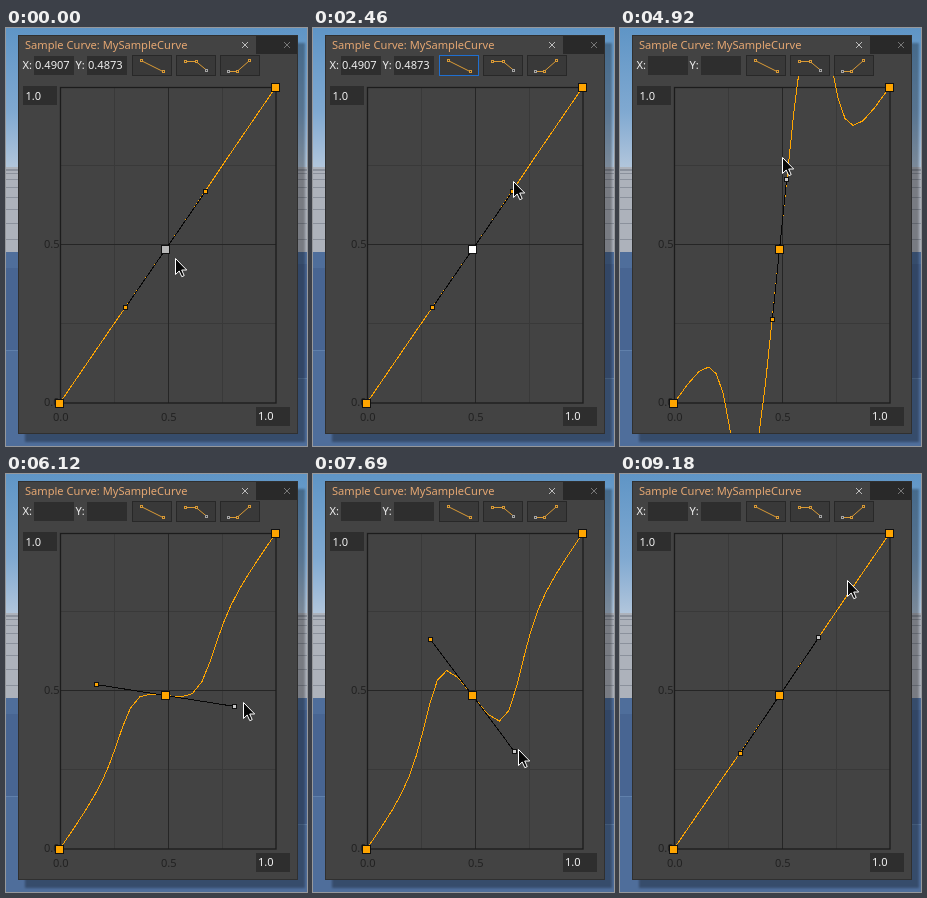
Animation of 301 by 418 pixels, one loop 9210 ms. Source, as an HTML page:

```html
<!DOCTYPE html>
<html lang="en">
<head>
<meta charset="utf-8">
<title>Curve editor</title>
<style>
  html, body { margin: 0; width: 100%; height: 100%; overflow: hidden; background: #434343; }
  svg { display: block; width: 301px; height: 418px; }
  text { font: 11.1px "Noto Sans", "Open Sans", sans-serif; fill: #f0f0f0; white-space: pre; }
  .axis { fill: #222; }
  .field { fill: #2e2e2e; }
  .key { fill: #ffa500; stroke: #111; }
  .icon path { fill: none; stroke: #d99a35; }
  .icon rect { fill: #333; stroke: #d99a35; }
  .icon .grey { stroke: #a5a5a5; }
  .crisp { fill: none; shape-rendering: crispEdges; }
</style>
</head>
<body>
<svg viewBox="0 0 301 418">
  <defs>
    <linearGradient id="sky" x2="0" y2="1">
      <stop offset="0" stop-color="#5f95c6"/>
      <stop offset=".6" stop-color="#80a9d1"/>
      <stop offset="1" stop-color="#b2c6dc"/>
    </linearGradient>
    <clipPath id="plot"><rect x="13" y="48" width="278" height="357"/></clipPath>
    <filter id="soft"><feGaussianBlur stdDeviation="1.2"/></filter>
  </defs>

  <rect width="301" height="140" fill="url(#sky)"/>
  <rect y="139" width="301" height="86" fill="#adb2bb"/>
  <g id="floor" stroke="#8b919c"></g>
  <rect y="224" width="301" height="194" fill="#4f6e9b"/>
  <path d="M0 240H12V322H0ZM292 236H301V350H292Z" fill="#486592"/>
  <path d="M0 322.5H12M292 350.5H301" stroke="#6080ab"/>

  <rect x="19" y="15" width="280" height="399" opacity=".3" filter="url(#soft)"/>
  <rect x="12" y="7" width="280" height="399" fill="#434343"/>
  <rect x="250" y="8" width="42" height="18" fill="#292929"/>
  <rect x="12.5" y="7.5" width="279" height="398" fill="none" stroke="#303030"/>
  <text x="19" y="21" style="fill:#e5a772">Sample Curve: MySampleCurve</text>
  <path d="M236 14l6 6m0-6l-6 6" stroke="#bdbdbd"/>
  <path d="M278 14l6 6m0-6l-6 6" stroke="#777"/>

  <g class="field">
    <rect x="28" y="28" width="40" height="19"/>
    <rect x="81" y="28" width="40" height="19"/>
    <rect x="17" y="58" width="34" height="19"/>
    <rect x="250" y="379" width="34" height="19"/>
  </g>
  <text x="16.5" y="41">X:</text>
  <text x="69.5" y="41">Y:</text>
  <g id="coords">
    <text x="29" y="41">0.4907</text>
    <text x="82" y="41">0.4873</text>
  </g>

  <g fill="#393939" stroke="#282828">
    <rect id="linear" x="126.5" y="27.5" width="39" height="20"/>
    <rect x="170.5" y="27.5" width="39" height="20"/>
    <rect x="214.5" y="27.5" width="39" height="20"/>
  </g>
  <g class="icon">
    <path d="M136 33L157 43.5M180 33.5H190L201 42.5M223 43.5H231L243 33"/>
    <rect x="134.5" y="31.5" width="2" height="2"/>
    <rect x="156.5" y="42.5" width="2" height="2"/>
    <rect x="178.5" y="32.5" width="2" height="2"/>
    <rect x="189.5" y="32.5" width="2" height="2"/>
    <rect class="grey" x="199.5" y="41.5" width="2" height="2"/>
    <rect class="grey" x="221.5" y="42.5" width="2" height="2"/>
    <rect x="230.5" y="42.5" width="2" height="2"/>
    <rect x="242.5" y="31.5" width="2" height="2"/>
  </g>

  <path d="M108.5 59V375M216.5 59V375M54 137.5H270M54 295.5H270" stroke="#393939"/>
  <path d="M162.5 59V375M54 216.5H270" stroke="#252525"/>
  <rect x="54.5" y="59.5" width="215.5" height="315.5" fill="none" stroke="#1c1c1c" stroke-width="1.3"/>
  <text x="19.5" y="72">1.0</text>
  <text x="252" y="392">1.0</text>
  <text class="axis" x="38" y="220">0.5</text>
  <text class="axis" x="38" y="378">0.0</text>
  <text class="axis" x="47" y="393">0.0</text>
  <text class="axis" x="155" y="393">0.5</text>

  <path id="curve" class="crisp" stroke="#ffa500" clip-path="url(#plot)"/>
  <path id="arm" class="crisp" stroke="#080808"/>
  <rect class="key" x="49.5" y="371.5" width="8" height="8"/>
  <rect class="key" x="265.5" y="55.5" width="8" height="8"/>
  <rect class="key" id="mid" x="155.5" y="217.5" width="8" height="8"/>
  <rect class="key" id="left" width="4" height="4"/>
  <rect class="key" id="right" width="4" height="4"/>
  <path id="cursor" d="M.5 .5V16.5L4.2 13L6.8 18.7L9.2 17.6L6.7 12H11.7Z" fill="#080808" stroke="#fff"/>
</svg>
<script>
const LOOP = 9210, STEP = 30, ARM = 70, END_SLOPE = 1.463;
const HOVER = 1190, GRAB = 2910;
const START = { x: 53.5, y: 375.5 }, MID = { x: 159.5, y: 221.5 }, END = { x: 269.5, y: 59.5 };
const REST = [169, 230], BUTTON = [150, 36], HANDLE = [200, 154];

// While dragging: ms, handle angle in degrees, pointer distance from the middle key.
const DRAG = [
  [GRAB, 55.4, 79], [3890, 85.9, 91], [4920, 84.2, 93], [6120, -9, 78],
  [7000, -84, 80], [7690, -53.2, 70], [9180, 55.9, 134]
];

const el = id => document.getElementById(id);
const mix = (a, b, k) => a + (b - a) * k;
const rad = deg => deg * Math.PI / 180;

function ease(t, from, to) {
  const k = Math.min(1, Math.max(0, (t - from) / (to - from)));
  return k * k * (3 - 2 * k);
}

function dragPose(t) {
  let i = 0;
  while (i < DRAG.length - 2 && t >= DRAG[i + 1][0]) i++;
  const [a, b] = [DRAG[i], DRAG[i + 1]];
  const k = ease(t, a[0], b[0]);
  return { angle: mix(a[1], b[1], k), reach: mix(a[2], b[2], k) };
}

// The pointer leads the handle by a few degrees while dragging.
function pointerAt(t, pose) {
  if (t >= GRAB) {
    const lead = rad(pose.angle + 4);
    return [MID.x + pose.reach * Math.cos(lead), MID.y - pose.reach * Math.sin(lead)];
  }
  const up = ease(t, 260, 1350), back = ease(t, 1980, 2490);
  return REST.map((v, i) => mix(mix(v, BUTTON[i], up), HANDLE[i], back));
}

// Points from the middle key to an end key, blending their two tangent lines.
function halfCurve(end, slope) {
  const points = [], n = 11, c = 0.55;
  for (let i = 0; i <= n; i++) {
    const s = i / n, r = 1 - s;
    const u = 3 * c * s * r * r + 3 * (1 - c) * s * s * r + s ** 3;
    const x = mix(MID.x, end.x, u);
    const w = 1 / (1 + Math.exp(13 * (u - 0.387)));
    const near = MID.y - slope * (x - MID.x);
    const far = end.y - END_SLOPE * (x - end.x);
    points.push(x.toFixed(2) + " " + mix(far, near, w).toFixed(2));
  }
  return points;
}

function place(node, x, y) {
  node.setAttribute("transform", `translate(${x} ${y})`);
}

function placeHandle(node, x, y) {
  place(node, Math.round(x - 2.5) + 0.5, Math.round(y - 2.5) + 0.5);
}

function draw(t) {
  const pose = dragPose(t), angle = rad(pose.angle);
  const dx = ARM * Math.cos(angle), dy = -ARM * Math.sin(angle);
  const slope = Math.tan(angle);
  const points = [...halfCurve(START, slope).reverse(), ...halfCurve(END, slope).slice(1)];
  el("curve").setAttribute("d", "M" + points.join("L"));
  el("arm").setAttribute("d", `M${MID.x - dx} ${MID.y - dy}L${MID.x + dx} ${MID.y + dy}`);
  placeHandle(el("left"), MID.x - dx, MID.y - dy);
  placeHandle(el("right"), MID.x + dx, MID.y + dy);

  const dragging = t >= GRAB;
  el("coords").style.display = dragging ? "none" : "";
  el("mid").style.fill = dragging ? "#ffa500" : t < 260 ? "#b8b8b8" : "#fff";
  el("right").style.fill = dragging ? "#c8c8c8" : "#ffa500";
  el("linear").style.stroke = t >= HOVER && !dragging ? "#1f6fd0" : "";

  const [x, y] = pointerAt(t, pose);
  place(el("cursor"), Math.round(x), Math.round(y));
}

// Floor lines spread out towards the viewer.
for (let i = 0; i < 9; i++) {
  const line = document.createElementNS("http://www.w3.org/2000/svg", "path");
  line.setAttribute("d", `M0 ${Math.round(141 + i * i * 1.1) + 0.5}H301`);
  el("floor").append(line);
}

const began = performance.now();
function tick() {
  const t = (performance.now() - began) % LOOP;
  draw(Math.floor(t / STEP) * STEP);
  requestAnimationFrame(tick);
}
tick();
</script>
</body>
</html>
```
